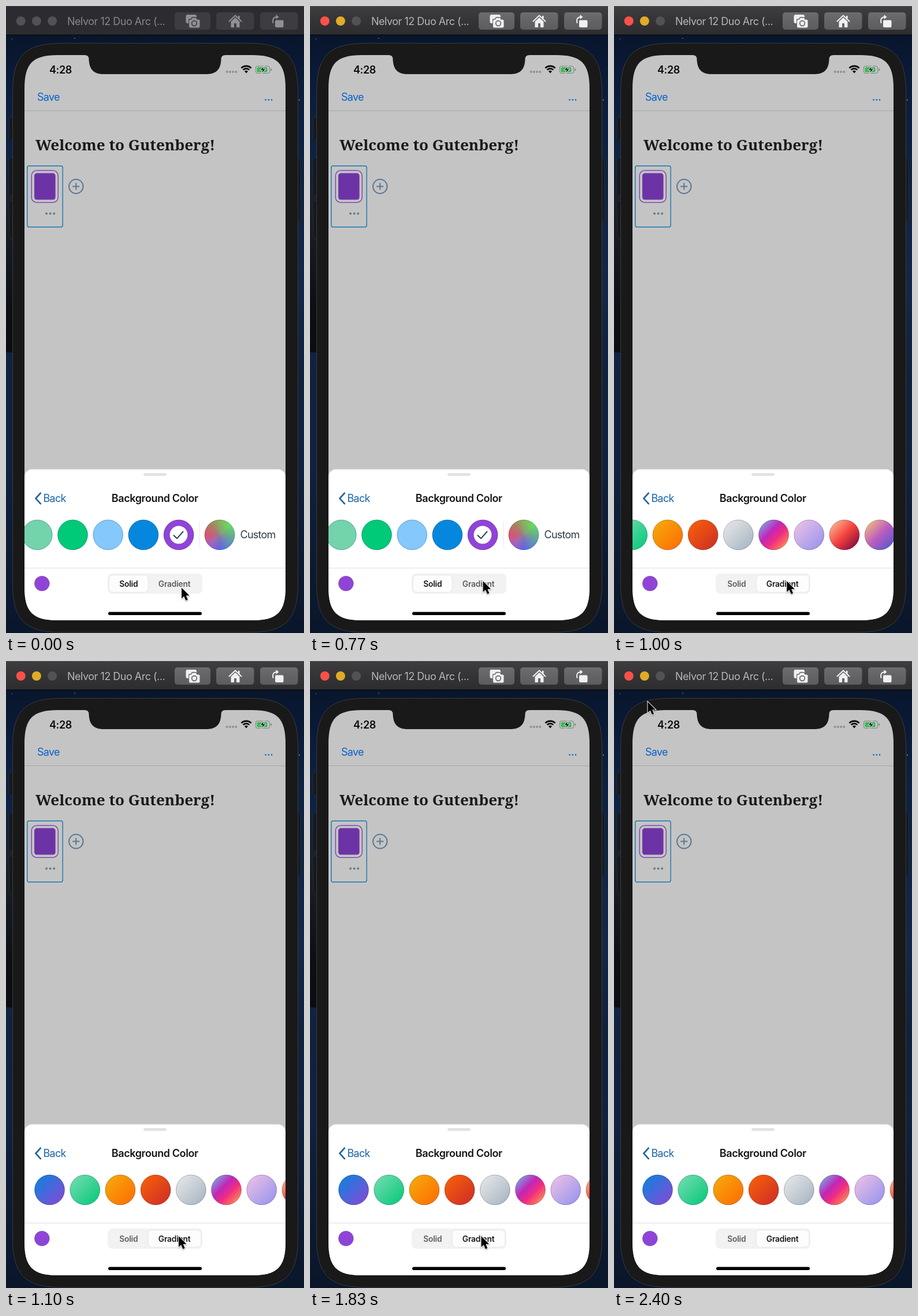
Write an HTML page with a canvas that moves like this. It is 516 by 1086 pixels and loops after 2430 ms.

```html
<!DOCTYPE html>
<html lang="en">
<head>
<meta charset="utf-8">
<title>Background color picker</title>
<style>
html, body { margin: 0; width: 100%; height: 100%; overflow: hidden; background: #0e1d35; }
canvas { display: block; width: 516px; height: 1086px; }
</style>
</head>
<body>
<canvas id="stage"></canvas>
<script>
const W = 516, H = 1086, LOOP = 2430;
const canvas = document.getElementById('stage');
const dpr = window.devicePixelRatio || 1;
canvas.width = W * dpr;
canvas.height = H * dpr;
const c = canvas.getContext('2d');

const SANS = 'Inter, "Liberation Sans", sans-serif';
const SERIF = '"Noto Serif", "Liberation Serif", serif';
const PURPLE = '#8f44d7';
const SOLIDS = ['#73d3ab', '#00c978', '#84c8fc', '#0587de', PURPLE];
const GRADIENTS = [
  ['#0587de', PURPLE],
  ['#7adcb4', '#00c978'],
  ['#f4ae0c', '#ff6900'],
  ['#fa6404', '#cb2a2a'],
  ['#eaeaea', '#a3b2c0'],
  ['#4aeadc', '#9778d1', '#bf27ba', '#ee2c82', '#fb6962', '#fef84c'],
  ['#f0c4e6', '#9390ee'],
  ['#fecda5', '#f5423f', '#6b003e'],
  ['#ffcb70', '#bb5cc0', '#4158d0'],
  ['#fff0d8', '#b0dfd8', '#33a7b5'],
  ['#c4ee8a', '#71ce7e'],
  ['#020381', '#2874fc']
];

// Times in ms
const FOCUS = 650, PRESS = 800, SWAP = 830, SCROLL = 883;

const clamp = (x) => Math.max(0, Math.min(1, x));
const ease = (x) => x * x * (3 - 2 * x);
const span = (t, from, to) => ease(clamp((t - from) / (to - from)));
const mix = (a, b, p) => a + (b - a) * p;

function shape(fill, stroke, width = 1) {
  if (fill) { c.fillStyle = fill; c.fill(); }
  if (stroke) { c.strokeStyle = stroke; c.lineWidth = width; c.stroke(); }
}
function box(x, y, w, h, r, fill, stroke, width) {
  c.beginPath();
  c.roundRect(x, y, w, h, r);
  shape(fill, stroke, width);
}
// Rectangle with continuous-curvature corners
function smoothBox(x, y, w, h, r) {
  const e = r * 1.35, d = r * 0.331, R = x + w, B = y + h;
  c.beginPath();
  c.moveTo(x + e, y);
  c.lineTo(R - e, y);
  c.bezierCurveTo(R - d, y, R, y + d, R, y + e);
  c.lineTo(R, B - e);
  c.bezierCurveTo(R, B - d, R - d, B, R - e, B);
  c.lineTo(x + e, B);
  c.bezierCurveTo(x + d, B, x, B - d, x, B - e);
  c.lineTo(x, y + e);
  c.bezierCurveTo(x, y + d, x + d, y, x + e, y);
  c.closePath();
}
function disc(x, y, r, fill, stroke, width) {
  c.beginPath();
  c.arc(x, y, r, 0, Math.PI * 2);
  shape(fill, stroke, width);
}
function poly(points, fill, stroke, width, close = true) {
  c.beginPath();
  points.forEach(([x, y]) => c.lineTo(x, y));
  if (close) c.closePath();
  shape(fill, stroke, width);
}
function text(str, x, y, size, weight, color, align = 'left', spacing = -0.4, family = SANS) {
  c.font = `${weight} ${size}px ${family}`;
  c.letterSpacing = spacing + 'px';
  c.textAlign = align;
  c.fillStyle = color;
  c.fillText(str, x, y);
}
function linear(x0, y0, x1, y1, colors) {
  const g = c.createLinearGradient(x0, y0, x1, y1);
  colors.forEach((color, i) => g.addColorStop(i / (colors.length - 1), color));
  return g;
}

function wallpaper() {
  c.fillStyle = linear(0, 50, 0, H, ['#08162d', '#0c2040', '#0f2546', '#112848', '#10213c', '#10223e', '#0d1b33', '#0a162a']);
  c.fillRect(0, 0, W, H);
  // Rocky shore along the left edge
  c.fillStyle = linear(0, 255, 0, 606, ['rgba(20,30,50,0)', '#1a212d', '#15181f', '#0d0f15', '#0a0c12']);
  c.fillRect(0, 255, 40, 345);
  [[119, 56, 0.8], [10, 57, 0.7], [508, 163, 0.9], [480, 78, 0.5]].forEach(([x, y, r]) => disc(x, y, r, '#8fa3c0'));
}

function titleBar(active) {
  c.fillStyle = active ? linear(0, 0, 0, 50, ['#3e3e41', '#343437', '#2d2d30']) : '#2c2c30';
  c.fillRect(0, 0, W, 50);
  c.fillStyle = active ? '#55565a' : '#3d3e42';
  c.fillRect(0, 0, W, 1);
  c.fillStyle = '#08090c';
  c.fillRect(0, 49.5, W, 1.5);
  const idle = '#525256';
  [active ? '#fc5148' : idle, active ? '#e0ab26' : idle, idle]
    .forEach((color, i) => disc(25.7 + 27.2 * i, 26, 8, color));
  text('Nelvor 12 Duo Arc (...', 106, 32.5, 18, 400, active ? '#b6b6b9' : '#87878a', 'left', -0.5);

  const face = active ? '#656568' : '#3d3d41';
  const ink = active ? '#f0f0f0' : '#919194';
  [[292, 62], [364, 65.5], [440, 65.5]].forEach(([x, w]) => {
    box(x, 11, w, 30, 5, active ? linear(0, 11, 0, 41, ['#6c6c6f', '#5c5c5f']) : face);
  });
  cameraIcon(ink, face);
  houseIcon(ink, face);
  rotateIcon(ink);
}
function cameraIcon(ink, face) {
  box(311.5, 15, 18.5, 15, 3, ink);
  poly([[316, 22.5], [319.5, 22.5], [322, 19], [329, 19], [331, 22.5], [336, 22.5], [336, 39], [316, 39]], face);
  box(317, 23.5, 18.5, 14, 2.5, ink);
  box(321.5, 20.5, 8.5, 5, 2, ink);
  disc(326, 30, 4.3, null, face, 1.7);
}
function houseIcon(ink, face) {
  c.lineCap = c.lineJoin = 'round';
  poly([[386.5, 26.5], [397, 16.5], [407.5, 26.5]], null, ink, 2, false);
  poly([[389.5, 27], [397, 20], [404.5, 27], [404.5, 37], [389.5, 37]], ink);
  c.fillStyle = ink;
  c.fillRect(402, 17, 2.6, 5);
  c.fillStyle = face;
  c.fillRect(395, 30, 4, 7);
}
function rotateIcon(ink) {
  box(466, 24.5, 14.5, 12.5, 2, ink);
  c.beginPath();
  c.moveTo(462.5, 29);
  c.bezierCurveTo(461, 22, 464, 19, 469, 19);
  shape(null, ink, 2);
  poly([[467.5, 15], [472.5, 19], [467.5, 23]], ink);
}

function phone() {
  [[193, 39], [263, 66], [338, 65]].forEach(([y, h]) => box(5.5, y, 9, h, 2, '#16181c', '#26282c'));
  box(500, 263, 9.5, 110, 2, '#16181c', '#26282c');
  smoothBox(11.5, 64.5, 494, 1020.5, 64);
  shape('#191919', '#3a3c40', 1);
}

function notch() {
  c.beginPath();
  c.moveTo(136, 84);
  c.lineTo(136, 85);
  c.quadraticCurveTo(143.5, 85, 143.5, 92);
  c.bezierCurveTo(144, 110, 152, 118, 169, 118);
  c.lineTo(347, 118);
  c.bezierCurveTo(364, 118, 372, 110, 372.5, 92);
  c.quadraticCurveTo(372.5, 85, 380, 85);
  c.lineTo(380, 84);
  c.closePath();
  shape('#191919');
}

function statusBar() {
  text('4:28', 75, 116.5, 18, 600, '#0a0a0a');
  for (let i = 0; i < 4; i++) disc(382.7 + 5.2 * i, 114, 2.1, '#929292');
  c.lineCap = 'butt';
  [12, 7.6].forEach((r) => {
    c.beginPath();
    c.arc(416, 116, r, -Math.PI * 0.75, -Math.PI * 0.25);
    shape(null, '#080808', 2.8);
  });
  c.beginPath();
  c.moveTo(416, 116.5);
  c.arc(416, 116, 4.2, -Math.PI * 0.75, -Math.PI * 0.25);
  c.closePath();
  shape('#080808');
  box(432.5, 104, 24, 12.5, 3.5, null, '#838383', 1.1);
  box(434.5, 106, 18, 8.5, 2, '#2bbd4e');
  box(458, 108, 1.8, 4.5, 1, '#838383');
  poly([[447.5, 102.8], [439.5, 111.2], [444, 111.2], [441.5, 117.8], [450, 109], [445.3, 109]], '#0a0a0a', '#c9c9c9', 1.2);
}

function editor() {
  text('Save', 54, 163.5, 18, 400, '#0761cd', 'left', -0.7);
  [449.5, 454.8, 460].forEach((x) => disc(x, 162.5, 1.35, '#0761cd'));
  c.fillStyle = '#a8a8aa';
  c.fillRect(32, 181, 452, 1);
  text('Welcome to Gutenberg!', 51, 250, 26.1, 700, '#191a1c', 'left', 0, SERIF);

  box(36.8, 277, 61.4, 105.8, 3, null, '#1878ae', 1.4);
  box(44.2, 284.8, 46, 55.6, 9, null, '#6f3aa8', 1.3);
  box(49, 289.6, 36.6, 46, 4.5, '#6d33a6');
  [70, 76.6, 83.2].forEach((x) => disc(x, 359.5, 1.9, '#5d7a92'));
  disc(121.3, 312.5, 12.2, null, '#5d788f', 2.1);
  c.fillStyle = '#5d788f';
  c.fillRect(115.3, 311.5, 12, 2);
  c.fillRect(120.3, 306.5, 2, 12);
}

function swatch(x, fill) {
  disc(x, 916, 26.2, fill);
  disc(x, 916, 25.8, null, 'rgba(40,50,70,.28)', 1);
}
function solidSwatches() {
  SOLIDS.forEach((color, i) => swatch(54.3 + 61.2 * i, color));
  disc(299, 916, 15.4, '#fff');
  c.lineCap = c.lineJoin = 'round';
  poly([[290.5, 917], [296, 922.3], [306.5, 910.5]], null, '#2c3a4b', 1.9, false);
  c.fillStyle = '#e6e8ea';
  c.fillRect(334.5, 894, 1, 44);

  const wheel = c.createConicGradient(0, 370, 916);
  const hues = ['#5cb88a', '#5a8fc8', '#5c66e4', '#a860c0', '#e0506c', '#b4785c', '#86b65a', '#62e05c', '#5cb88a'];
  hues.forEach((color, i) => wheel.addColorStop(i / 8, color));
  swatch(370, wheel);
  const haze = c.createRadialGradient(370, 916, 0, 370, 916, 24);
  haze.addColorStop(0, 'rgba(150,128,140,.7)');
  haze.addColorStop(1, 'rgba(150,128,140,0)');
  disc(370, 916, 24, haze);
  text('Custom', 405.5, 922.3, 18, 400, '#2c3a4b', 'left', -0.75);
}
function gradientSwatches(t) {
  const offset = 266 * (1 - span(t, SCROLL, SCROLL + 205));
  c.save();
  c.globalAlpha = span(t, SWAP - 20, SWAP + 140);
  GRADIENTS.forEach((colors, i) => {
    const x = 75.5 + 61.2 * i - offset;
    if (x < 520) swatch(x, linear(x - 26, 890, x + 26, 942, colors));
  });
  c.restore();
}

function segments(t) {
  const p = span(t, PRESS, PRESS + 110);
  const chosen = t >= SWAP;
  box(176, 983, 164, 35, 8, '#f2f2f3');
  c.save();
  c.shadowColor = 'rgba(0,0,0,.06)';
  c.shadowBlur = 3 * dpr;
  box(mix(179, 247, p), 986.3, mix(66.5, 90, p), 28.4, 6.5, '#fdfdfd');
  c.restore();
  const on = '#17181a', off = '#5c5d60';
  text('Solid', 212.3, 1005.6, 13.8, 600, chosen ? off : on, 'center', -0.2);
  text('Gradient', 291.6, 1005.6, 13.8, 600, chosen ? on : off, 'center', -0.2);
}

function sheet(t) {
  box(32, 802.5, 452, 270, [13, 13, 0, 0], '#fff');
  box(238, 809, 40, 5, 2.5, '#e1e3e6');
  c.lineCap = 'butt';
  c.lineJoin = 'miter';
  poly([[60.5, 842.8], [51.5, 852.8], [60.5, 862.8]], null, '#1a64a3', 2.7, false);
  text('Back', 64.5, 859, 18, 400, '#1a64a3', 'left', -0.75);
  text('Background Color', 257.8, 859, 18, 600, '#141517', 'center');

  if (t < SWAP) solidSwatches();
  else gradientSwatches(t);

  c.fillStyle = '#dfe1e4';
  c.fillRect(32, 973, 452, 1);
  disc(62.3, 1000.3, 13, PURPLE, 'rgba(40,50,70,.2)');
  segments(t);
  box(177, 1049.5, 162, 5.4, 2.7, '#000');
}

function pointer(t) {
  const settle = span(t, 30, 430);
  const drift = span(t, 800, 1800);
  const leave = span(t, 1850, 2310);
  const x = mix(mix(304, 299.6, settle) - 3.1 * drift, 58.5, leave);
  const y = mix(mix(1007.5, 996.3, settle), 70.8, leave);
  c.save();
  c.translate(x, y);
  c.scale(0.96, 0.96);
  c.lineJoin = 'miter';
  const arrow = [[0, 0], [0, 19.6], [4.4, 15.6], [7.7, 23.2], [11.3, 21.6], [8.1, 14.2], [14, 14]];
  c.shadowColor = 'rgba(0,0,0,.3)';
  c.shadowBlur = 2 * dpr;
  c.shadowOffsetY = dpr;
  poly(arrow, '#000', '#fff', 2);
  c.shadowColor = 'transparent';
  poly(arrow, '#000');
  c.restore();
}

function draw(t) {
  c.setTransform(dpr, 0, 0, dpr, 0, 0);
  wallpaper();
  titleBar(t >= FOCUS);
  phone();
  c.save();
  smoothBox(32, 85, 452, 979, 43);
  c.clip();
  c.fillStyle = '#c4c4c5';
  c.fillRect(32, 85, 452, 979);
  statusBar();
  editor();
  sheet(t);
  c.restore();
  notch();
  pointer(t);
}

// Motion advances at thirty steps per second
const start = performance.now();
function tick() {
  const t = (performance.now() - start) % LOOP;
  draw(Math.floor((t + 3.4) * 0.03) / 0.03);
  requestAnimationFrame(tick);
}
tick();
</script>
</body>
</html>
```
